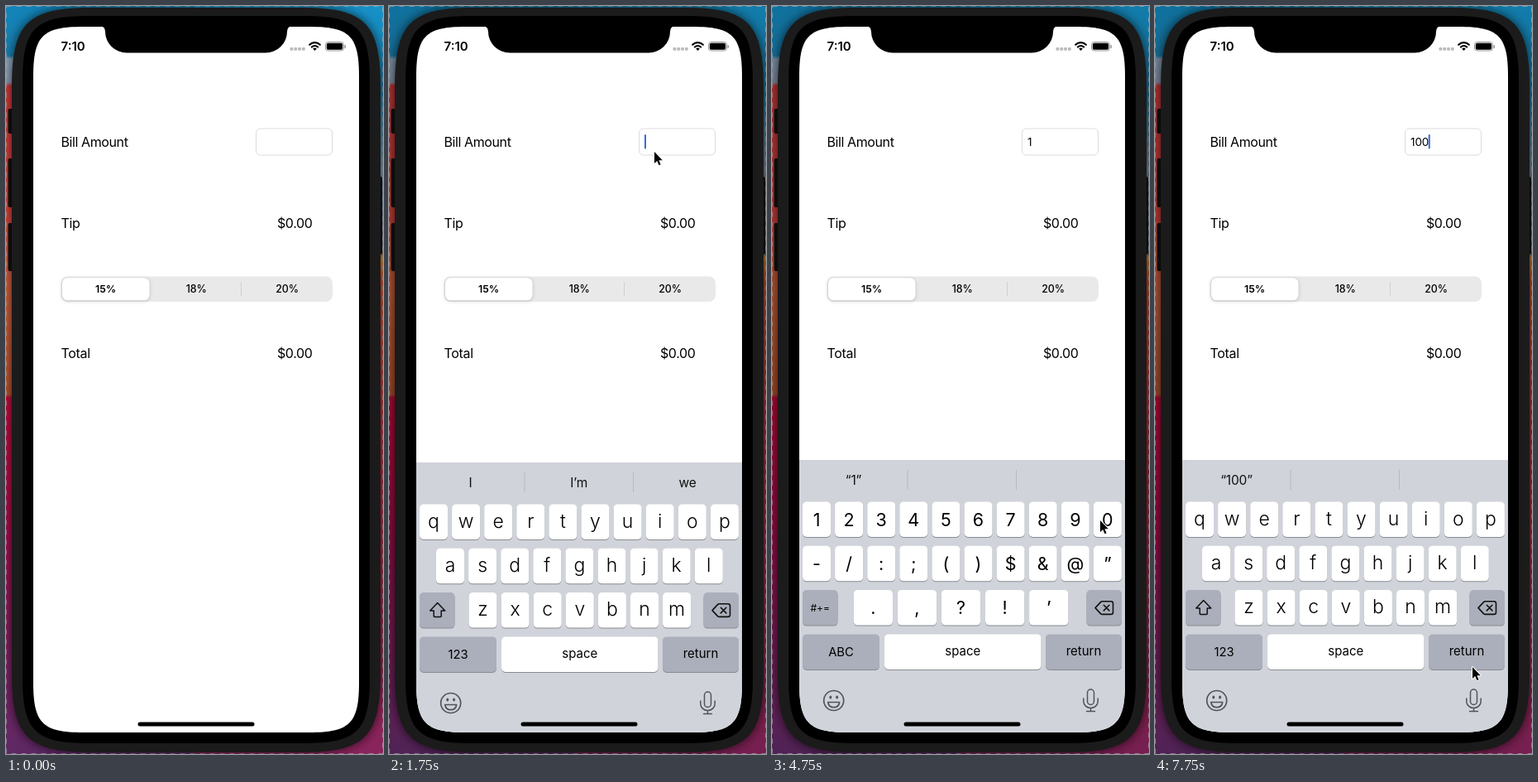
Recreate the animation shown at these times as an HTML page with a canvas. Size 456 px wide and 903 px high, loop 8000 ms.

```html
<!DOCTYPE html>
<html lang="en">
<head>
<meta charset="utf-8">
<title>Tip calculator</title>
<style>
  html, body { margin: 0; width: 100%; height: 100%; overflow: hidden; background: #000; }
  canvas { display: block; width: 456px; height: 903px; }
</style>
</head>
<body>
<canvas width="456" height="903"></canvas>
<script>
const ctx = document.querySelector('canvas').getContext('2d');
const LOOP = 8000, STEP = 250;
const KEY_H = 42.5, ROW_GAP = 53.3, PITCH = 39.1;
const DARK_KEY = '#abafbb', ICON = '#50545b';

// [time, x, y] of the pointer tip
const POINTER = [
  [500, 470, 430], [1000, 330, 200], [1250, 320, 175], [1750, 320, 175],
  [2750, 85, 775], [3000, 85, 775], [3500, 61, 583], [3750, 56, 618],
  [4000, 56, 618], [4750, 396, 620], [5000, 394, 626], [6500, 394, 626],
  [7250, 85, 778], [7500, 85, 778], [7750, 383, 797]
];
const TYPED = [[1250, ''], [4000, '1'], [4900, '10'], [5175, '100']];

function box(x, y, w, h, r, fill, stroke) {
  ctx.beginPath();
  ctx.roundRect(x, y, w, h, r);
  if (fill) { ctx.fillStyle = fill; ctx.fill(); }
  if (stroke) { ctx.strokeStyle = stroke; ctx.lineWidth = 1; ctx.stroke(); }
}

// Rectangle with continuous corners: the curve starts well before a plain arc would.
function smoothBox(x, y, w, h, r) {
  const e = r * 1.5, c = r * 0.28, R = x + w, B = y + h;
  const p = new Path2D();
  p.moveTo(x + e, y);
  p.lineTo(R - e, y);
  p.bezierCurveTo(R - c, y, R, y + c, R, y + e);
  p.lineTo(R, B - e);
  p.bezierCurveTo(R, B - c, R - c, B, R - e, B);
  p.lineTo(x + e, B);
  p.bezierCurveTo(x + c, B, x, B - c, x, B - e);
  p.lineTo(x, y + e);
  p.bezierCurveTo(x, y + c, x + c, y, x + e, y);
  return p;
}

const BODY = smoothBox(7, 2, 446, 899, 65);
const BEZEL = smoothBox(20, 12, 420, 878, 53);
const SCREEN = smoothBox(33, 25, 394, 852, 40);

function fillPath(shape, color) {
  ctx.fillStyle = color;
  ctx.fill(shape);
}

function text(str, x, y, size, { align = 'left', weight = 400, spacing = -0.3, color = '#000' } = {}) {
  ctx.font = `${weight} ${size}px Inter, sans-serif`;
  ctx.letterSpacing = spacing + 'px';
  ctx.textAlign = align;
  ctx.fillStyle = color;
  ctx.fillText(str, x, y);
  return ctx.measureText(str).width;
}

function path(d, { fill, stroke, width = 1.6, x = 0, y = 0 }) {
  ctx.save();
  ctx.translate(x, y);
  ctx.lineWidth = width;
  ctx.lineJoin = ctx.lineCap = 'round';
  const shape = new Path2D(d);
  if (stroke) { ctx.strokeStyle = stroke; ctx.stroke(shape); }
  if (fill) fillPath(shape, fill);
  ctx.restore();
}

function wallpaper(x, w, stops) {
  const g = ctx.createLinearGradient(0, 0, 0, 903);
  for (const [y, color] of stops) g.addColorStop(y / 903, color);
  ctx.fillStyle = g;
  ctx.fillRect(x, 0, w, 903);
}

function phone(t) {
  wallpaper(0, 228, [[0, '#1287bd'], [60, '#1a80b0'], [64, '#8fa5bd'], [92, '#8fa0b8'], [96, '#d23a3c'],
    [250, '#d8413a'], [340, '#d0603c'], [469, '#b9532f'], [473, '#c5093a'], [640, '#a50c4c'],
    [800, '#7c2263'], [903, '#5f2a66']]);
  wallpaper(228, 228, [[0, '#1595cd'], [100, '#1c7fae'], [200, '#8197ab'], [295, '#6e7684'], [305, '#d28a2e'],
    [330, '#d0502f'], [500, '#c2303a'], [700, '#a82648'], [903, '#8c2560']]);
  ctx.fillStyle = `rgba(0,0,0,${t < STEP ? 0.02 : 0.16})`;
  ctx.fillRect(0, 0, 456, 903);

  ctx.setLineDash([6, 6]);
  ctx.strokeStyle = 'rgba(190,190,190,.55)';
  ctx.lineWidth = 1;
  ctx.strokeRect(0.5, 0.5, 455, 902);
  ctx.setLineDash([]);

  for (const [y, h] of [[124, 30], [184, 59], [262, 58]]) box(2.5, y, 8, h, 2, '#111');
  box(450, 206, 5, 94, 2, '#111');
  ctx.save();
  ctx.shadowColor = 'rgba(0,0,0,.7)';
  ctx.shadowBlur = 13;
  fillPath(BODY, '#1b1b1b');
  ctx.restore();
  fillPath(BEZEL, '#000');
  fillPath(SCREEN, '#fff');
}

function statusBar() {
  path('M114 24 Q120 25 120 31 A26 25.5 0 0 0 146 56.5 H314 A26 25.5 0 0 0 340 31 Q340 25 346 24 Z', { fill: '#000' });
  text('7:10', 66.5, 54, 15, { weight: 600, spacing: 0 });
  for (let i = 0; i < 4; i++) box(343.5 + i * 4.8, 50, 3.8, 3.8, 1, '#bbb');
  path('M-6.3 -6.3 A9 9 0 0 1 6.3 -6.3 M-3.6 -3.5 A5.2 5.2 0 0 1 3.6 -3.5',
    { stroke: '#000', width: 2.2, x: 373.5, y: 53 });
  path('M0 1 L-2.3 -1.4 A3.4 3.4 0 0 1 2.3 -1.4 Z', { fill: '#000', x: 373.5, y: 53 });
  box(386.5, 43.5, 22, 10.5, 3, null, '#999');
  box(387.8, 44.8, 19.4, 7.9, 1.8, '#000');
  box(409.5, 47, 1.5, 4, 0.8, '#999');
}

function form(value, caretOn) {
  text('Bill Amount', 66.5, 170, 16, { spacing: -0.4 });
  text('Tip', 66.5, 268, 16);
  text('Total', 66.5, 425, 16);
  for (const y of [268, 425]) text('$0.00', 328, y, 16, { spacing: -0.4 });

  box(302.5, 148, 92, 32, 5, '#fff', '#dcdcdc');
  const width = text(value, 309, 168.7, 13.5, { spacing: -0.1 });
  if (caretOn) box(309 + width - (value ? 0.5 : 0), 155, 2, 17.5, 1, '#3b69dc');

  box(66.5, 326.5, 328.5, 30.5, 8, '#e9e9ea');
  ctx.save();
  ctx.shadowColor = 'rgba(0,0,0,.2)';
  ctx.shadowBlur = 4;
  ctx.shadowOffsetY = 1;
  box(68, 328.3, 105.5, 27, 6.5, '#fff');
  ctx.restore();
  box(284, 333, 1, 17, 0, '#cfcfd2');
  ['15%', '18%', '20%'].forEach((label, i) =>
    text(label, 120.5 + i * 109.8, 346.3, 12.4, { align: 'center', weight: i ? 500 : 600, spacing: -0.1 }));
}

function key(x, y, w, label, size, drop = 8, fill = '#fff', weight = 400) {
  box(x, y + 1, w, KEY_H, 4.8, '#898b91');
  box(x, y, w, KEY_H, 4.8, fill);
  if (label) text(label, x + w / 2, y + KEY_H / 2 + drop, size, { align: 'center', spacing: 0, weight });
}

function letterRow(letters, x, y) {
  [...letters].forEach((c, i) => key(x + i * PITCH, y, 34, c, 23, 7, '#fff', 350));
}

function symbolRow(symbols, x, y, w = 34, pitch = PITCH) {
  [...symbols].forEach((c, i) => key(x + i * pitch, y, w, c, 21.5, 7.8));
}

function keyboard(top, numeric, value) {
  ctx.save();
  ctx.clip(SCREEN);
  box(33, top, 394, 340, 0, '#d0d3da');
  for (const x of [163.5, 295]) box(x, top + 12, 1, 24, 0, '#b6b9c0');
  (value ? [`“${value}”`] : ['I', 'I’m', 'we']).forEach((word, i) =>
    text(word, 98.5 + i * 131.3, top + 30, 15.5, { align: 'center', spacing: -0.2, color: '#111' }));

  const [y1, y2, y3, y4] = [0, 1, 2, 3].map(i => top + 50.5 + i * ROW_GAP);
  if (numeric) {
    symbolRow('1234567890', 37, y1);
    symbolRow('-/:;()$&@”', 37, y2);
    symbolRow('.,?!’', 98.7, y3, 47.3, 53.1);
    key(37, y3, 42.5, '#+=', 12, 4.5, DARK_KEY);
  } else {
    letterRow('qwertyuiop', 37, y1);
    letterRow('asdfghjkl', 57, y2);
    letterRow('zxcvbnm', 96.5, y3);
    key(37, y3, 42.5, '', 0, 0, DARK_KEY);
    path('M0 -9 L9 0.5 H4.5 V7 Q4.5 8 3.5 8 H-3.5 Q-4.5 8 -4.5 7 V0.5 H-9 Z',
      { stroke: '#111', width: 1.5, x: 58.7, y: y3 + 21.5 });
  }
  key(380.5, y3, 42.5, '', 0, 0, DARK_KEY);
  path('M-11 0 L-4.5 -7 Q-3.7 -7.8 -2.5 -7.8 H8 Q10.5 -7.8 10.5 -5.3 V5.3 Q10.5 7.8 8 7.8 H-2.5 Q-3.7 7.8 -4.5 7 Z M-0.7 -3.3 L5.9 3.3 M5.9 -3.3 L-0.7 3.3',
    { stroke: '#111', x: 402, y: y3 + 21.5 });
  key(37, y4, 93, numeric ? 'ABC' : '123', 14.8, 5.5, DARK_KEY);
  key(136, y4, 189.5, 'space', 15, 4.7);
  key(331, y4, 92, 'return', 15, 4.7, DARK_KEY);

  const iconY = top + 290.5;
  path('M12 0 A12 12 0 1 1 -12 0 A12 12 0 1 1 12 0 Z M-7 2 H7 Q6 8.2 0 8.2 Q-6 8.2 -7 2 Z',
    { stroke: ICON, width: 1.7, x: 74.7, y: iconY });
  path('M-5.4 -4 A1.5 2 0 1 0 -2.4 -4 A1.5 2 0 1 0 -5.4 -4 Z M2.4 -4 A1.5 2 0 1 0 5.4 -4 A1.5 2 0 1 0 2.4 -4 Z',
    { fill: ICON, x: 74.7, y: iconY });
  path('M-4 -9.5 A4 4 0 0 1 4 -9.5 V1 A4 4 0 0 1 -4 1 Z M-8.7 -2.5 V1 A8.7 8 0 0 0 8.7 1 V-2.5 M0 9 V13 M-5 13 H5',
    { stroke: ICON, width: 1.5, x: 385.5, y: iconY });
  ctx.restore();
}

function pointer(t) {
  if (t < POINTER[0][0]) return;
  const next = POINTER.findIndex(p => p[0] >= t);
  const [t1, x1, y1] = POINTER[next];
  const [t0, x0, y0] = POINTER[Math.max(0, next - 1)];
  const u = t1 > t0 ? (t - t0) / (t1 - t0) : 1;
  path('M1 1 V15 L4.2 12 L6.5 17.2 L8.6 16.3 L6.4 11.2 H10.8 Z',
    { fill: '#000', stroke: '#fff', width: 2, x: x0 + (x1 - x0) * u, y: y0 + (y1 - y0) * u });
}

function render(now) {
  const t = Math.floor((now % LOOP) / STEP) * STEP;
  const last = TYPED.filter(k => k[0] <= t).pop();
  const value = last ? last[1] : '';
  const caretOn = last && (t - last[0]) % 1120 < 560;

  phone(t);
  statusBar();
  form(value, caretOn);
  if (t >= 1500) {
    const drop = 111 * Math.pow(3 / 111, (t - 1500) / STEP);
    keyboard(548 + Math.round(drop), t >= 3000 && t < 7750, value);
  }
  box(159.5, 864.5, 141, 5, 2.5, '#000');
  pointer(t);
}

function tick() {
  render(performance.now());
  requestAnimationFrame(tick);
}
tick();
</script>
</body>
</html>
```
